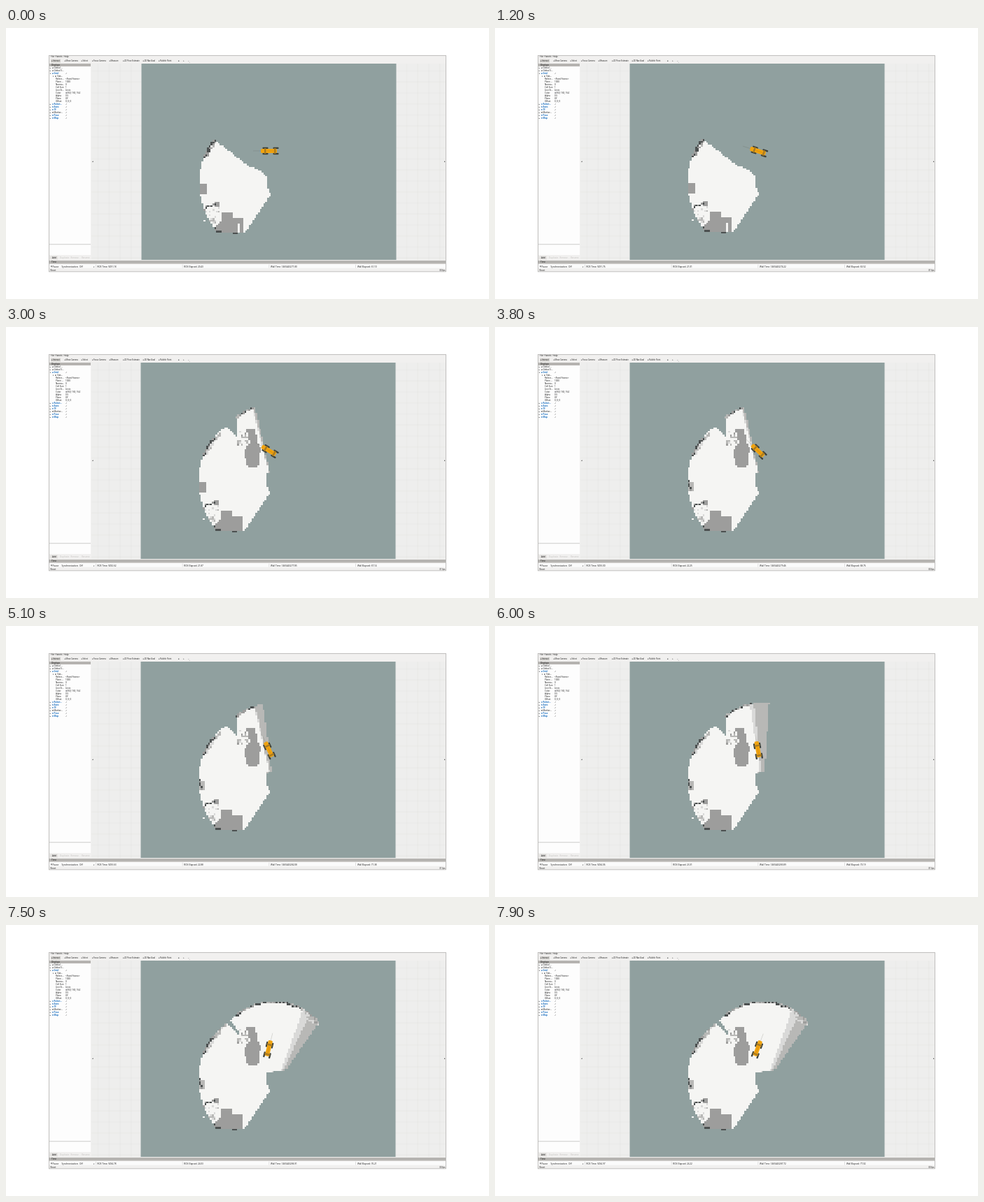
Recreate the animation shown at these times as an HTML page with a canvas. Size 690 px wide and 388 px high, loop 8000 ms.

```html
<!DOCTYPE html>
<html>
<head>
<meta charset="utf-8">
<style>
html, body { margin: 0; width: 100%; height: 100%; overflow: hidden; background: #fff }
canvas { display: block }
</style>
</head>
<body>
<canvas id="stage" width="690" height="388"></canvas>
<script>
const ctx = document.getElementById('stage').getContext('2d');
const LOOP = 8000, CELL = 2.6, OX = 193.6, OY = 51;
const WHITE = '#f5f5f3', PALE = '#d9d9d8', LIGHT = '#b8b8b6', MID = '#9d9d9c', DARK = '#4c5050', TEAL = '#90a09f';
const FONT = '"Open Sans", "Noto Sans", sans-serif';

let seed = 7;
const random = () => (seed = seed * 16807 % 2147483647) / 2147483647;
const pick = list => list[Math.floor(random() * list.length)];

function rect(color, x, y, w, h, radius = 0) {
  ctx.fillStyle = color;
  ctx.beginPath();
  ctx.roundRect(x, y, w, h, radius);
  ctx.fill();
}

function text(s, x, y, size = 3.1, color = '#111', weight = 400) {
  ctx.font = `${weight} ${size}px ${FONT}`;
  ctx.fillStyle = color;
  ctx.fillText(s, x, y);
}

// Flat list of points on an arc, angles in degrees
function arc(cx, cy, r, a0, a1) {
  return Array.from({ length: 13 }, (_, i) => (a0 + (a1 - a0) * i / 12) * Math.PI / 180)
    .flatMap(a => [cx + r * Math.cos(a), cy + r * Math.sin(a)]);
}
const wall = (a0, a1, r = 98) => arc(374, 222, r, a0, a1);
const horizon = (a0, a1) => arc(384, 194, 83, a0, a1);

const cellAt = (x, y, color) => [Math.floor((x - OX) / CELL), Math.floor((y - OY) / CELL), color];
const layers = [];

// Cells covered by a polygon, shown from one time to another
function area(from, color, pts, to = LOOP) {
  const path = new Path2D(), cells = [];
  for (let i = 0; i < pts.length; i += 2) path.lineTo(pts[i], pts[i + 1]);
  for (let r = 20; r < 98; r++)
    for (let c = 28; c < 104; c++)
      if (ctx.isPointInPath(path, OX + (c + .5) * CELL, OY + (r + .5) * CELL)) cells.push([c, r, color]);
  layers.push({ from, to, cells });
}

const box = (from, color, x, y, w, h, to) => area(from, color, [x, y, x + w, y, x + w, y + h, x, y + h], to);

// Cells along a line in random colours
function trail(from, colors, pts, to = LOOP) {
  const cells = [];
  for (let i = 2; i < pts.length; i += 2) {
    const [x, y, u, v] = pts.slice(i - 2, i + 2);
    const n = Math.ceil(Math.hypot(u - x, v - y) / 2);
    for (let k = 0; k <= n; k++) cells.push(cellAt(x + (u - x) * k / n, y + (v - y) * k / n, pick(colors)));
  }
  layers.push({ from, to, cells });
}

// Random cells inside a box
function scatter(from, colors, x, y, w, h, n) {
  const cells = Array.from({ length: n }, () => cellAt(x + random() * w, y + random() * h, pick(colors)));
  layers.push({ from, to: LOOP, cells });
}

// Fan seen by the scanner, from its fixed left side to the given edge angle
function fan(from, color, edge, to) {
  area(from, color, [...horizon(-130, edge), 384 + .35 * (edge + 90), 208, 372, 213, 347, 198, 331, 160], to);
}

// First room
area(0, WHITE, [...wall(161, 219), 347, 198, 361, 203, 373, 212, 372, 227, 378, 238, 341, 294, 300, 292]);
area(2300, LIGHT, [303, 153, 312, 145, 331, 160, 334, 137, 348, 139, 368, 180, 382, 210, 361, 203, 347, 198, 299, 162], 2900);
scatter(2300, [MID, LIGHT], 335, 124, 14, 14, 7);

// Scanner sweep: start, then the white, pale and light edge angles
const SWEEP = [[2900, -112, -111, -109], [4500, -110, -109, -101], [5400, -103, -99, -84], [6300, -95, -89, -60], [7100, -60, -52, -40]];
area(2900, WHITE, [...wall(215, 233), 331, 158, 347, 198]);
SWEEP.forEach(([from, white, pale, light], i) => {
  const to = SWEEP[i + 1]?.[0];
  fan(from, LIGHT, light, to);
  fan(from, PALE, pale, to);
  fan(from, WHITE, white, to);
  trail(from, [DARK, MID, LIGHT], horizon(-130, i < 3 ? white : light - 4), to);
});
area(7100, WHITE, [313, 143, 331, 130, 342, 168, 331, 158]);
area(7100, TEAL, [316, 140, 322, 138, 335, 155, 332, 158]);
trail(7100, [MID, LIGHT, PALE], [425, 123, 435, 138, 446, 142]);

// Walls
trail(0, [DARK, DARK, MID], wall(203, 219));
trail(0, [MID, LIGHT, DARK], wall(204, 217, 95), 2900);
trail(2900, [LIGHT, PALE], wall(205, 225, 95));
trail(6300, [LIGHT, MID, PALE], wall(219, 233));

// Obstacle beside the vehicle
area(2300, MID, [345, 148, 358, 148, 360, 166, 365, 174, 361, 201, 346, 201, 341, 178, 349, 166]);
scatter(2300, [MID, LIGHT, PALE, LIGHT], 333, 150, 14, 20, 22);

// Lower obstacles
box(0, MID, 278, 223, 8, 15, 3300);
box(3300, LIGHT, 278, 223, 7, 13);
trail(3300, [DARK, MID], wall(172, 180, 95));
scatter(0, [PALE, WHITE, LIGHT], 284, 258, 20, 20, 40);
box(0, MID, 297, 249, 9, 8);
trail(0, [DARK, MID], [284, 260, 288, 255, 304, 252]);
area(0, MID, [307, 265, 323, 265, 323, 273, 339, 273, 339, 294, 305, 292, 299, 284, 307, 277]);
trail(0, [WHITE], [332, 282, 332, 291], 2900);
trail(0, [DARK, DARK, MID], [298, 286, 301, 290, 306, 291]);
trail(0, [DARK], [324, 293, 330, 293]);

const TOOLS = [['Interact', 67], ['Move Camera', 85.5], ['Select', 109.5], ['Focus Camera', 125], ['Measure', 149.5],
  ['2D Pose Estimate', 169], ['2D Nav Goal', 197.5], ['Publish Point', 220]];

// label, value, depth (0 top level, 1 child, 2 property), blue
const TREE = [['Global ...', '', 0], ['Global S...', '', 0], ['Grid', '✓', 0, 1], ['Stat...', '', 1], ['Refere...', '<Fixed Frame>', 2],
  ['Plane ...', '1000', 2], ['Norma...', '0', 2], ['Cell Size', '1', 2], ['Line St...', 'Lines', 2], ['Color', '   160; 160; 164', 2],
  ['Alpha', '0.5', 2], ['Plane', 'XY', 2], ['Offset', '0; 0; 0', 2], ['Robot...', '✓', 0, 1], ['Axes', '✓', 0, 1],
  ['TF', '✓', 0, 1], ['Marker...', '✓', 0], ['Pose', '✓', 0, 1], ['Map', '✓', 0, 1]];

function drawView(s) {
  ctx.save();
  ctx.beginPath();
  ctx.rect(122, 51, 506, 281);
  ctx.clip();
  rect('#eeeeed', 122, 51, 506, 281);
  for (let x = 131; x < 630; x += 15.75) rect('rgba(90,90,80,.03)', x, 51, 1, 281);
  for (let y = 61; y < 332; y += 15.75) rect('rgba(90,90,80,.03)', 122, y, 506, 1);
  // the view settles by one pixel; whole steps keep the cells seamless
  const shift = s < .6 ? 0 : -1;
  ctx.translate(shift, shift);
  rect(TEAL, 193.5, 51, 364, 290);
  for (const { from, to, cells } of layers)
    if (s * 1000 >= from && s * 1000 < to)
      for (const [c, r, color] of cells) {
        const x = Math.round(OX + c * CELL), y = Math.round(OY + r * CELL);
        ctx.fillStyle = color;
        ctx.fillRect(x, y, Math.round(OX + (c + 1) * CELL) - x, Math.round(OY + (r + 1) * CELL) - y);
      }
  ctx.restore();
  text('◂', 123, 192, 3);
  text('▸', 626, 192, 3);
}

function drawVehicle(s) {
  // a short turn, a pause, then a steady turn
  const yaw = s < 2.5 ? 15 * Math.min(s, 1.5) : 22.5 + 16.3 * (s - 2.5);
  ctx.save();
  ctx.translate(377 - 2.2 * (s / 7.9) ** 2, 176 + Math.min(s / 2, 2));
  ctx.rotate(yaw * Math.PI / 180);
  rect('rgba(90,90,80,.25)', -24, -.4, 12, .7);
  for (const x of [-10.5, 4.5]) for (const y of [-5.2, 2.9]) rect('#3b403b', x, y, 8, 2.3, .8);
  rect('#f0a30f', -13, -3.1, 23, 6.2, 1.5);
  for (const x of [-8, 6]) rect('#a67a24', x, -4, 2.5, 8);
  rect('#d68e12', -4, -.4, 11, .8);
  ctx.restore();
}

function drawPanels(s) {
  text('File', 64, 42.1, 3.3);
  text('Panels', 70.5, 42.1, 3.3);
  text('Help', 82.5, 42.1, 3.3);
  rect('#d6d4d1', 64, 44.6, 14, 5);
  for (const [label, x] of TOOLS) {
    rect('#666', x - 1.8, 46.4, 1, 1.6);
    text(label, x, 48.4, 2.7);
  }
  rect('#777', 246, 46.5, 1.4, 1.4);
  text('+', 253, 48, 3);
  text('−,', 260, 48.5, 3);

  rect('#b5b3b0', 62, 51, 59, 4);
  text('Displays', 65, 53.9);
  rect('#fdfdfd', 62, 55, 59, 254.5);
  rect('#bbb', 62, 309.5, 59, .7);
  rect('#fdfdfd', 62, 310.5, 59, 14.5);
  TREE.forEach(([label, value, depth, blue], i) => {
    const y = 58.2 + i * 3.98, color = blue ? '#1a6fc0' : '#111';
    if (depth < 2) {
      text(depth || i === 2 ? '▾' : '▸', 62.8 + depth * 4, y, 2.6);
      rect(blue ? '#5a95cc' : '#777', 66 + depth * 4, y - 1.8, 1.6, 1.6);
    }
    text(label, depth === 2 ? 71 : 68.6 + depth * 4.5, y, 3, color, blue ? 700 : 400);
    text(value, 85, y, 3);
  });
  rect('#a0a0a4', 85.2, 91.7, 2.4, 2.4);
  rect('#e2e0de', 63, 326.5, 11, 5);
  text('Add', 66, 330.3);
  ['Duplicate', 'Remove', 'Rename'].forEach((label, i) => text(label, 77 + i * 15.5, 330.3, 3, '#c4c2c0'));

  rect('#b5b3b0', 61, 333, 567, 4.4);
  text('Time', 65, 336.4);
  rect('#fbfbfb', 61, 338.3, 567, 5.4);
  rect('#777', 64, 340.2, 1.6, 2);
  text('Pause', 66.5, 342.5);
  text('Synchronization:  Off', 79.5, 342.5);
  text('▾', 125, 342.5, 2.6);
  const ros = 20.43 + .48 * s, real = 61.1 + 2.015 * s;
  const fields = { 'ROS Time: ': 9270.75 + ros, 'ROS Elapsed: ': ros, 'Wall Time: ': 1465443210.7 + real, 'Wall Elapsed: ': real };
  Object.entries(fields).forEach(([label, value], i) => {
    const x = 130.5 + i * 123.8;
    rect('#ccc', x - 2.5, 338.8, .6, 4.6);
    text(label + value.toFixed(2), x, 342.5);
  });
  text('Reset', 63.5, 347.8, 3);
  text(Math.floor(s / 1.2) % 3 ? '31 fps' : '30 fps', 619, 347.8, 3);
}

function draw(now) {
  const s = Math.floor(now % LOOP / 100) / 10;
  rect('#fff', 0, 0, 690, 388);
  rect('#f1f0ef', 61, 39, 567.5, 310);
  drawView(s);
  drawVehicle(s);
  drawPanels(s);
  ctx.lineWidth = .7;
  ctx.strokeStyle = '#a9a8a6';
  ctx.strokeRect(61.4, 39.3, 567, 309.6);
  requestAnimationFrame(draw);
}
requestAnimationFrame(draw);
</script>
</body>
</html>
```
